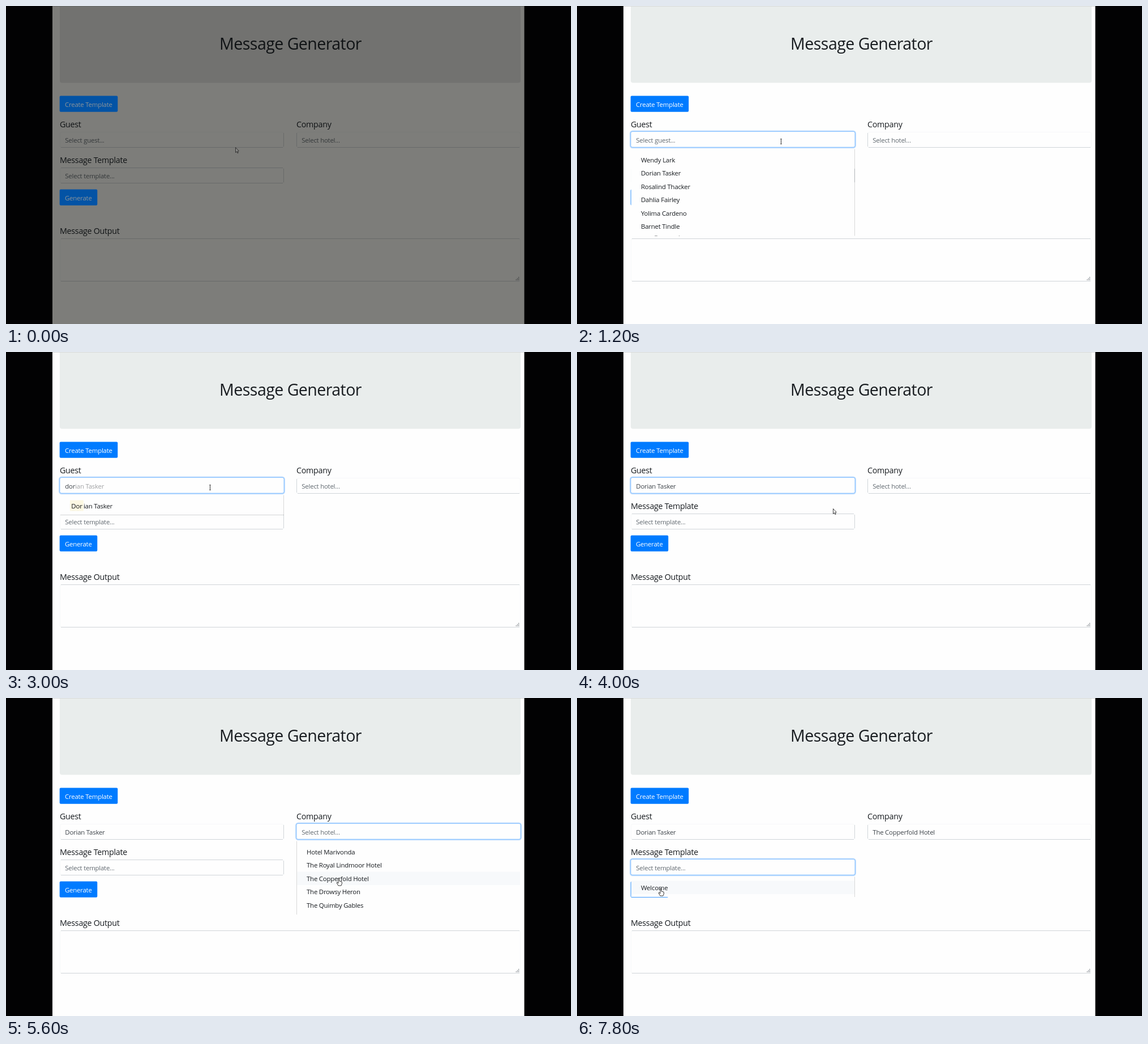
Recreate the animation shown at these times as an HTML page with a canvas. Size 998 by 561 pixels, loop 8000 ms.

```html
<!DOCTYPE html>
<html lang="en">
<head>
<meta charset="utf-8">
<title>Message Generator</title>
<style>
html, body { margin: 0; width: 100%; height: 100%; overflow: hidden; background: #000; }
canvas { display: block; width: 998px; height: 561px; }
</style>
</head>
<body>
<canvas id="stage" width="998" height="561"></canvas>
<script>
const g = document.getElementById('stage').getContext('2d');
const LOOP = 8000, STEP = 200, ROW = 23.5;
const BODY = 11.76, LABEL = 14.7, TITLE = 29.4;

const LIT = { page: '#fefefe', jumbo: '#e9edec', blue: '#007bff', onBlue: '#fff', ink: '#181c20',
  value: '#3d4349', hint: '#60686f', line: '#d0d5d9', top: '#d8dada' };
const DIM = { page: '#7d7d7a', jumbo: '#727270', blue: '#0353a5', onBlue: '#8d9499', ink: '#101315',
  value: '#24282c', hint: '#34383a', line: '#686a6a', top: '#666866' };

const GUEST = 'Dorian Tasker', HOTEL = 'The Copperfold Hotel';
const guests = ['Wendy Lark', GUEST, 'Rosalind Thacker', 'Dahlia Fairley', 'Yolima Cardeno', 'Barnet Tindle'];
const hotels = ['Hotel Marivonda', 'The Royal Lindmoor Hotel', HOTEL, 'The Drowsy Heron', 'The Quimby Gables'];
const fields = {
  guest: { x: 95, y: 221.5, label: 'Guest', hint: 'Select guest...', sides: 'rb' },
  hotel: { x: 513, y: 221.5, label: 'Company', hint: 'Select hotel...', sides: 'lb' },
  template: { x: 95, y: 284.5, label: 'Message Template', hint: 'Select template...', sides: 'trb' }
};
const FW = 396, FH = 28;

// time, x, y of the pointer
const path = [
  [0, 405, 249], [400, 405, 249], [1000, 360, 239], [3400, 360, 239], [4000, 452, 276],
  [4600, 600, 238], [5000, 600, 238], [5400, 588, 318], [5800, 588, 318],
  [6600, 200, 300], [7000, 200, 300], [7600, 148, 336], [8000, 148, 336]
];

let c = LIT;

function pointerAt(t) {
  const i = path.findIndex((p, k) => k && t <= p[0]);
  const [t0, x0, y0] = path[i - 1], [t1, x1, y1] = path[i];
  const u = (t - t0) / (t1 - t0), e = u * u * (3 - 2 * u);
  return { x: x0 + (x1 - x0) * e, y: y0 + (y1 - y0) * e };
}

function stateAt(t) {
  const s = { focus: null, open: null, items: [], typed: '', guest: '', hotel: '', template: '' };
  if (t >= 1000 && t < 4600) s.focus = 'guest';
  else if (t >= 4600 && t < 5800) s.focus = 'hotel';
  else if (t >= 6800) s.focus = 'template';

  if (t >= 1800 && t < 3400) s.typed = GUEST.slice(0, t < 2200 ? 1 : t < 2600 ? 2 : 3).toLowerCase();
  if (t >= 3400) s.guest = GUEST;
  if (t >= 5800) s.hotel = HOTEL;

  if (s.focus && !s[s.focus]) {
    s.open = s.focus;
    s.items = { guest: guests, hotel: hotels, template: ['Welcome'] }[s.open]
      .filter(n => n.toLowerCase().startsWith(s.typed));
  }
  return s;
}

function setFont(size) {
  g.font = `${size * 0.972}px "Open Sans", "Noto Sans", sans-serif`;
  g.letterSpacing = `${-size * 0.019}px`;
}

function text(str, x, y, color, size = BODY) {
  setFont(size);
  g.fillStyle = color;
  g.fillText(str, x, y);
  return g.measureText(str).width;
}

function rect(x, y, w, h, color) {
  g.fillStyle = color;
  g.fillRect(x, y, w, h);
}

function round(x, y, w, h, r) {
  g.beginPath();
  g.roundRect(x, y, w, h, r);
}

function frameLines(x, y, w, h, sides) {
  g.lineWidth = 1;
  g.strokeStyle = c.line;
  g.globalAlpha = 0.15;
  round(x + 0.5, y + 0.5, w - 1, h - 1, 3);
  g.stroke();
  g.globalAlpha = 1;
  if (sides.includes('t')) rect(x + 2, y, w - 4, 1, c.line);
  if (sides.includes('b')) rect(x + 2, y + h - 1, w - 4, 1, c.line);
  if (sides.includes('l')) rect(x, y + 2, 1, h - 4, c.line);
  if (sides.includes('r')) rect(x + w - 1, y + 2, 1, h - 4, c.line);
}

function button(label, x, y, w) {
  round(x - 0.3, y - 0.4, w + 0.6, 28.2, 2);
  g.fillStyle = c.blue;
  g.fill();
  text(label, x + 9, y + 19, c.onBlue);
}

function field(name, s) {
  const f = fields[name], base = f.y + 19.3;
  text(f.label, f.x, f.y - 8, c.ink, LABEL);
  if (s.focus === name) {
    g.lineWidth = 2.4;
    g.strokeStyle = 'rgba(0,123,255,.22)';
    round(f.x - 0.9, f.y - 0.9, FW + 1.8, FH + 1.4, 4);
    g.stroke();
    g.lineWidth = 1;
    g.strokeStyle = '#80bdff';
    round(f.x - 0.2, f.y - 0.2, FW + 0.4, FH, 3);
    g.stroke();
  } else {
    frameLines(f.x, Math.round(f.y), FW, FH, f.sides);
  }
  if (s.typed && name === 'guest') {
    const w = text(s.typed, f.x + 9.3, base, c.value);
    text(GUEST.slice(s.typed.length), f.x + 9.3 + w, base, '#a0a2a4');
  } else {
    text(s[name] || f.hint, f.x + 9.3, base, s[name] ? c.value : c.hint);
  }
}

function menu(s, p) {
  const f = fields[s.open], top = f.y + FH + 10;
  const x = f.x, y = f.y + FH + 3, bottom = top + s.items.length * ROW + 5;
  rect(x + 0.5, y, FW - 1.5, bottom - y, c.page);
  const edge = s.open === 'hotel' ? x : x + FW - 1;
  rect(edge, y, 1, bottom - y, 'rgba(0,0,0,.15)');
  if (s.typed) rect(x + 1, bottom - 1, FW - 2, 1, '#d2d4d5');

  s.items.forEach((name, i) => {
    const rowY = top + i * ROW, base = rowY + 16;
    if (hits(p, x, rowY, FW, ROW)) rect(x + 1, rowY, FW - 2, ROW, '#f7f9fb');
    let tx = x + 18;
    const n = s.typed.length;
    if (n) {
      setFont(BODY);
      const w = g.measureText(name.slice(0, n)).width;
      rect(tx, rowY + 2, w + 4.7, 19, '#fcf8e3');
      text(name.slice(0, n), tx + 2.35, base, '#101316');
      tx += w + 4.7;
    }
    text(name.slice(n), tx, base, c.ink);
  });
}

function hits(p, x, y, w, h) {
  return p.x >= x && p.x < x + w && p.y >= y && p.y < y + h;
}

function shape(points, fill, stroke) {
  g.beginPath();
  for (const [x, y] of points) g.lineTo(x, y);
  g.closePath();
  g.fillStyle = fill;
  g.fill();
  g.lineWidth = 0.9;
  g.lineJoin = 'round';
  g.strokeStyle = stroke;
  g.stroke();
}

function pointer(p, s) {
  const inField = Object.values(fields).some(f => hits(p, f.x, f.y, FW, FH - 0.6));
  const f = s.open && fields[s.open];
  const inMenu = f && hits(p, f.x, f.y + FH + 10, FW, s.items.length * ROW);
  g.save();
  g.translate(Math.round(p.x), Math.round(p.y));
  if (inMenu) {
    shape([[-1, 0], [0.5, 0], [1, 5], [5, 6], [5.5, 9], [4, 13], [-1, 13], [-4, 8], [-3, 7], [-1, 9]],
      '#fff', '#222');
  } else if (inField) {
    rect(0, -4, 1, 8, '#333');
    rect(-1, -5, 3, 1, '#666');
    rect(-1, 4, 3, 1, '#666');
  } else {
    shape([[0.5, 0.5], [0.5, 9.5], [2.6, 7.7], [4, 10.7], [5.3, 10], [4, 7.2], [6.3, 6.8]],
      c === DIM ? '#8a8a88' : '#fff', '#2a2a2a');
  }
  g.restore();
}

function output() {
  text('Message Output', 95, 401.5, c.ink, LABEL);
  frameLines(95, 410, 814, 76, 'tb');
  for (let i = 0; i < 3; i++)
    for (let j = 0; j <= i; j++) rect(905 - j * 2.2, 478 + i * 2.2, 1.2, 1.2, c.hint);
}

function draw(t) {
  c = t < 200 ? DIM : LIT;
  const s = stateAt(t), p = pointerAt(t);
  rect(0, 0, 998, 561, '#020203');
  rect(82, 0, 833.5, 561, c.page);
  round(95, -4, 814, 139.5, 4);
  g.fillStyle = c.jumbo;
  g.fill();
  rect(82, 0, 833, 1, c.top);

  g.textAlign = 'center';
  text('Message Generator', 502.5, 77, c.ink, TITLE);
  g.textAlign = 'left';
  button('Create Template', 95, 159, 102);
  button('Generate', 95, 324, 66);
  output();
  for (const name in fields) field(name, s);
  if (s.open) menu(s, p);
  pointer(p, s);
}

function tick() {
  const t = performance.now() % LOOP;
  draw(Math.floor(t / STEP) * STEP);
  requestAnimationFrame(tick);
}
tick();
</script>
</body>
</html>
```
